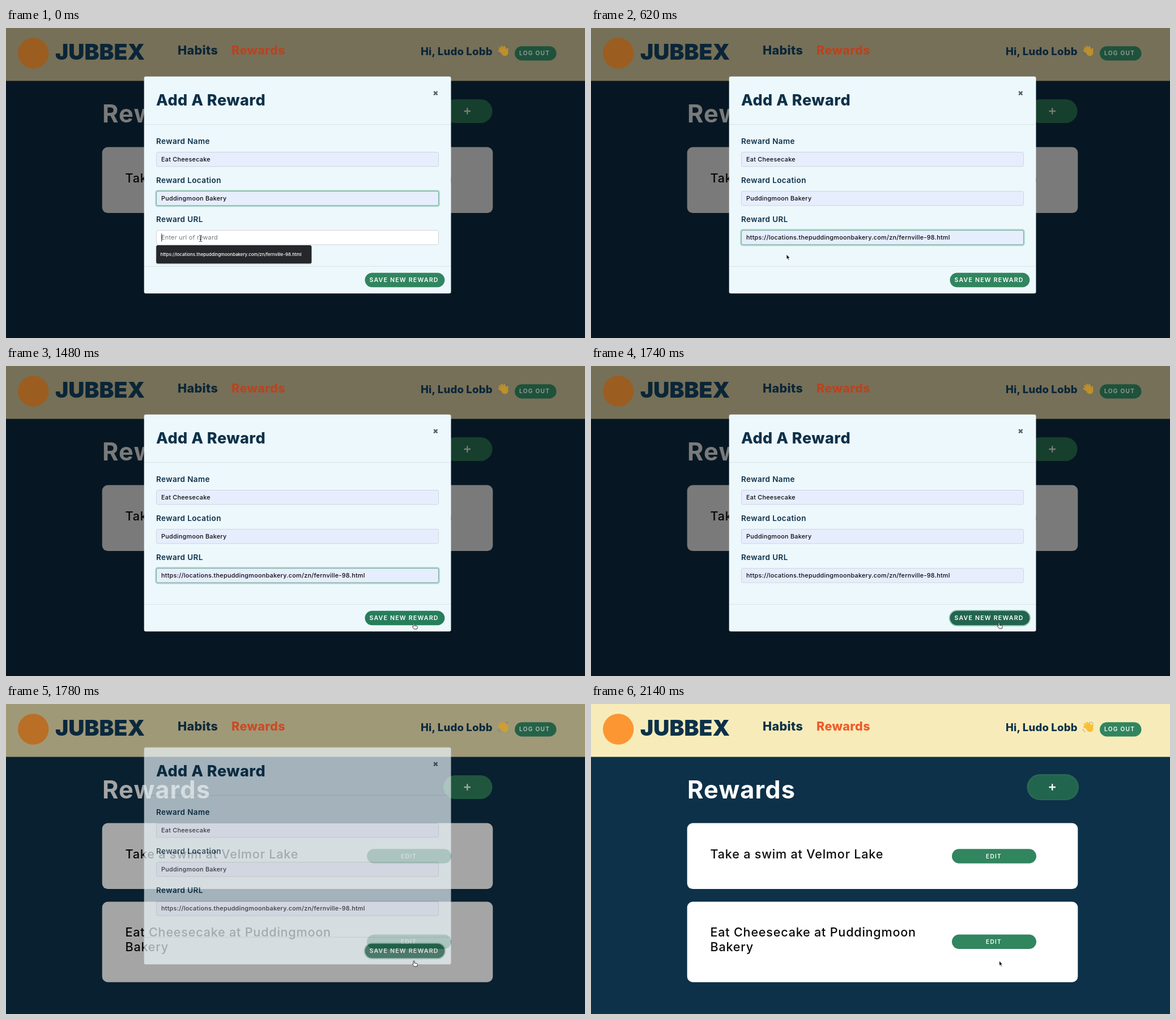
An HTML page that plays this animation: 1022x548 px, repeating every 2.16 s.

```html
<!DOCTYPE html>
<html lang="en">
<head>
<meta charset="utf-8">
<title>Add a reward</title>
<style>
  html, body { margin: 0; width: 100%; height: 100%; overflow: hidden; background: #0d3149; }
  svg { display: block; width: 100%; height: 100%; }
  text { font-family: Inter, "Open Sans", sans-serif; white-space: pre; }
  .logo { font-size: 39px; font-weight: 900; }
  .nav { font-size: 21.6px; font-weight: 800; letter-spacing: .015em; }
  .hi { font-size: 18.5px; font-weight: 800; letter-spacing: .012em; }
  .h1 { font-size: 43.3px; font-weight: 700; letter-spacing: .027em; fill: #fff; }
  .h2 { font-size: 27px; font-weight: 800; letter-spacing: .018em; }
  .item { font-size: 21.6px; font-weight: 500; letter-spacing: .036em; fill: #0a0a0c; }
  .label { font-size: 13.5px; font-weight: 600; letter-spacing: .03em; }
  .input { font-size: 10.8px; font-weight: 500; letter-spacing: .025em; fill: #0a0a0c; }
  .hint { font-weight: 400; fill: #6c757d; }
  .btn { font-size: 10.6px; font-weight: 600; letter-spacing: 1.2px; fill: #fff; }
  .small { font-size: 10.1px; letter-spacing: 1.3px; }
  .tip { font-size: 7.85px; font-weight: 500; fill: #fff; }
  .navy { fill: #0d3149; }
  .green { fill: #31855f; }
  .field { fill: #e6eefe; stroke: #ced4da; }
  .ring rect { fill: none; stroke: #b2dccf; stroke-width: 2.4; }
  .ring rect + rect { stroke: #72ab96; stroke-width: 1; }
  .arrow { fill: #111; stroke: #fff; stroke-width: .9; stroke-linejoin: round; }
</style>
</head>
<body>
<svg viewBox="0 0 1022 548" preserveAspectRatio="none">
  <rect width="1022" height="548" fill="#0d3149"/>
  <rect width="1022" height="93.5" fill="#f7ecb9"/>

  <text class="h1" x="170" y="167">Rewards</text>
  <rect id="addRing" x="769.5" y="124" width="91.5" height="46" rx="23" fill="#2b6853"/>
  <rect id="add" x="772" y="126" width="86.5" height="42" rx="21"/>
  <path d="M808.5 147H820M814.2 141.2V152.8" stroke="#fff" stroke-width="2.3"/>

  <rect x="169.7" y="210.5" width="689.6" height="116.6" rx="10" fill="#fff"/>
  <text class="item" x="210.5" y="272.5">Take a swim at Velmor Lake</text>
  <rect class="green" x="637" y="256.3" width="149" height="25.4" rx="12.7"/>
  <text class="btn small" x="697" y="272.6">EDIT</text>

  <g id="newCard">
    <rect x="169.7" y="349.5" width="689.6" height="142.2" rx="10" fill="#fff"/>
    <text class="item" x="210.5" y="411">Eat Cheesecake at Puddingmoon</text>
    <text class="item" x="210.5" y="437">Bakery</text>
    <rect class="green" x="637" y="407.5" width="149" height="25.4" rx="12.7"/>
    <text class="btn small" x="697" y="423.8">EDIT</text>
  </g>

  <rect id="shade" width="1022" height="548"/>

  <g id="nav">
    <text class="logo navy" x="87" y="56">JUBBEX</text>
    <text class="nav navy" x="303" y="46.5">Habits</text>
    <text class="nav" x="398" y="46.5" fill="#f15a2b">Rewards</text>
    <text class="hi navy" x="732" y="48">Hi, Ludo Lobb</text>
    <g fill="none" stroke="#f9bd3a" stroke-width="3.2" stroke-linecap="round">
      <path d="M879 45L870.5 40M879 43L871.5 35.5M880 41L875 33M882 40L879.5 33.5M884 44L885 37"/>
      <circle cx="880.5" cy="43.5" r="4.4" fill="#f9bd3a"/>
      <path d="M868 44.5Q869 48 872 49.5M882 31.8Q885 32 886.5 34.5" stroke="#7d8a90" stroke-width=".9"/>
    </g>
  </g>
  <g id="badges">
    <circle cx="48.2" cy="44.5" r="27.2" fill="#fb9633"/>
    <rect class="green" x="898" y="32.2" width="73.5" height="25.3" rx="12.6"/>
    <text class="btn small" x="906" y="48.4">LOG OUT</text>
  </g>

  <g id="modal">
    <rect x="243.7" y="85.8" width="541.8" height="383.5" rx="3" fill="#edf8fd"/>
    <path d="M244 170.5H785M244 421.3H785" stroke="#d8e2e7"/>
    <text class="h2 navy" x="265" y="137">Add A Reward</text>
    <path d="M755.2 112.2L761.4 118.4M761.4 112.2L755.2 118.4" stroke="#566168" stroke-width="2.6"/>

    <text class="label navy" x="265" y="205">Reward Name</text>
    <rect class="field" x="265.5" y="219.5" width="498" height="25.3" rx="2.5"/>
    <text class="input" x="274" y="236">Eat Cheesecake</text>

    <text class="label navy" x="265" y="274">Reward Location</text>
    <rect class="field" x="265.5" y="288.6" width="498" height="25.3" rx="2.5"/>
    <g class="ring" id="placeRing">
      <rect x="264.3" y="287.4" width="500.4" height="27.7" rx="3.5"/>
      <rect x="265.5" y="288.6" width="498" height="25.3" rx="2.5"/>
    </g>
    <text class="input" x="274" y="305">Puddingmoon Bakery</text>

    <text class="label navy" x="265" y="343">Reward URL</text>
    <rect class="field" id="url" x="265.5" y="357.7" width="498" height="25.3" rx="2.5"/>
    <g class="ring" id="urlRing">
      <rect x="264.3" y="356.5" width="500.4" height="27.7" rx="3.5"/>
      <rect x="265.5" y="357.7" width="498" height="25.3" rx="2.5"/>
    </g>
    <text class="input hint" id="hint" x="274" y="374">Enter url of reward</text>
    <text class="input" id="value" x="274" y="374">https://locations.thepuddingmoonbakery.com/zn/fernville-98.html</text>
    <path id="caret" d="M0 363.5V377.5" stroke="#111" stroke-width=".9"/>

    <rect id="saveRing" x="631.5" y="430.9" width="144.8" height="29.3" rx="14.6" fill="#a9d0c1"/>
    <rect id="save" x="633.5" y="432.8" width="140.8" height="25.5" rx="12.7"/>
    <text class="btn" x="641.5" y="449.4">SAVE NEW REWARD</text>

    <g id="list">
      <rect x="264.6" y="384.6" width="275.4" height="33" rx="3.5" fill="#000" opacity=".22"/>
      <rect x="265.2" y="384" width="274" height="32.2" rx="3" fill="#26272a"/>
      <rect id="row" x="265.2" y="389" width="274" height="22.5" fill="#3d3e42"/>
      <text class="tip" x="272.5" y="403">https://locations.thepuddingmoonbakery.com/zn/fernville-98.html</text>
    </g>
  </g>

  <g id="cursor">
    <g id="beam" fill="none" stroke-linecap="round">
      <path id="bar" d="M-2-5Q0-5 0-3.6Q0-5 2-5M0-3.6V4.6M-2 6Q0 6 0 4.6Q0 6 2 6M-1.3 2H1.3"/>
      <use href="#bar" stroke="#fff" stroke-width="2"/>
      <use href="#bar" stroke="#222"/>
    </g>
    <path id="arrow" class="arrow" d="M0 0V9L2 7.3 3.4 10.4 4.9 9.8 3.6 6.8 6.2 6.6Z"/>
    <path id="hand" d="M-1 .8C-1-.5 1-.5 1 .8V4L5.3 4.8C6.3 5 6.4 6 6.2 7L5.4 10H.6L-2.5 6.5C-2.8 5.2-1.6 5.1-1 6Z"
      fill="#fff" stroke="#222" stroke-width=".9" stroke-linejoin="round"/>
  </g>
</svg>
<script>
  const LOOP = 2160, FADE = 90, SLIDE = 180;
  const AT = { focus: 20, preview: 400, pick: 580, hover: 1380, press: 1680, close: 1752, closed: 1860 };
  const GREEN = [49, 133, 95], HOVER = [39, 126, 91], DARK = [34, 101, 79];

  // time, x, y of the pointer's hot spot
  const TRACK = [
    [0, 343.5, 371.5], [200, 343.5, 371.5], [340, 343.5, 384.5], [520, 345, 400],
    [620, 345, 400], [960, 717.5, 474.5], [1060, 718, 484], [1140, 718, 484],
    [1400, 720, 455], [1640, 720, 455], [1680, 720, 454], [LOOP, 720.5, 453.8]
  ];
  // spans in which the caret is lit
  const CARET = [[0, 360], [880, 1180], [1500, AT.press]];

  const el = {};
  document.querySelectorAll("[id]").forEach(n => el[n.id] = n);

  const ramp = (t, start, span = FADE) => Math.min(1, Math.max(0, (t - start) / span));
  const smooth = p => p * p * (3 - 2 * p);
  const easeOut = p => 1 - (1 - p) ** 1.75;
  const lerp = (a, b, p) => a + (b - a) * p;
  const mix = (a, b, p) => `rgb(${a.map((v, i) => Math.round(lerp(v, b[i], p)))})`;
  const show = (node, on) => node.setAttribute("visibility", on ? "inherit" : "hidden");
  const fade = (node, o) => node.setAttribute("opacity", o);
  const light = (node, b) => node.style.filter = `brightness(${b})`;

  function pointAt(t) {
    const i = Math.max(1, TRACK.findIndex(k => k[0] > t));
    const [a, b] = [TRACK[i - 1], TRACK[i]];
    const p = smooth((t - a[0]) / (b[0] - a[0]));
    return [lerp(a[1], b[1], p), lerp(a[2], b[2], p)];
  }

  function drawForm(t) {
    const filled = t >= AT.preview;
    const focus = ramp(t, AT.focus), press = ramp(t, AT.press, 50);
    fade(el.placeRing, 1 - focus);
    fade(el.urlRing, focus * (1 - press));
    el.url.style.fill = filled ? "#e6eefe" : "#fff";
    show(el.hint, !filled);
    show(el.value, filled);
    show(el.caret, CARET.some(([a, b]) => t >= a && t < b));
    const end = filled ? 274.6 + el.value.getComputedTextLength() : 274.8;
    el.caret.setAttribute("transform", `translate(${end} 0)`);
    show(el.list, t < AT.pick);
    show(el.row, filled && t < AT.pick);
    fade(el.saveRing, press);
    el.save.style.fill = press ? mix(HOVER, DARK, press) : mix(GREEN, HOVER, ramp(t, AT.hover));
  }

  function drawPage(t) {
    const out = ramp(t, AT.close), back = ramp(t, AT.closed);
    fade(el.modal, 1 - out);
    el.modal.setAttribute("transform", `translate(0 ${-34 * easeOut(ramp(t, AT.close, SLIDE))})`);
    fade(el.shade, .52 * (1 - out));
    light(el.nav, lerp(.76, 1, out));
    light(el.badges, lerp(.62, 1, out));
    show(el.newCard, t >= AT.close);
    fade(el.addRing, back);
    el.add.style.fill = mix(GREEN, DARK, back);
  }

  function drawPointer(t) {
    const [x, y] = pointAt(t);
    const beam = t < 320, hand = t >= AT.hover && t < AT.closed;
    el.cursor.setAttribute("transform", `translate(${x} ${y})`);
    show(el.beam, beam);
    show(el.hand, hand);
    show(el.arrow, !beam && !hand);
  }

  const begin = performance.now();
  function frame() {
    const t = (performance.now() - begin) % LOOP;
    drawForm(t);
    drawPage(t);
    drawPointer(t);
    requestAnimationFrame(frame);
  }
  frame();
</script>
</body>
</html>
```
